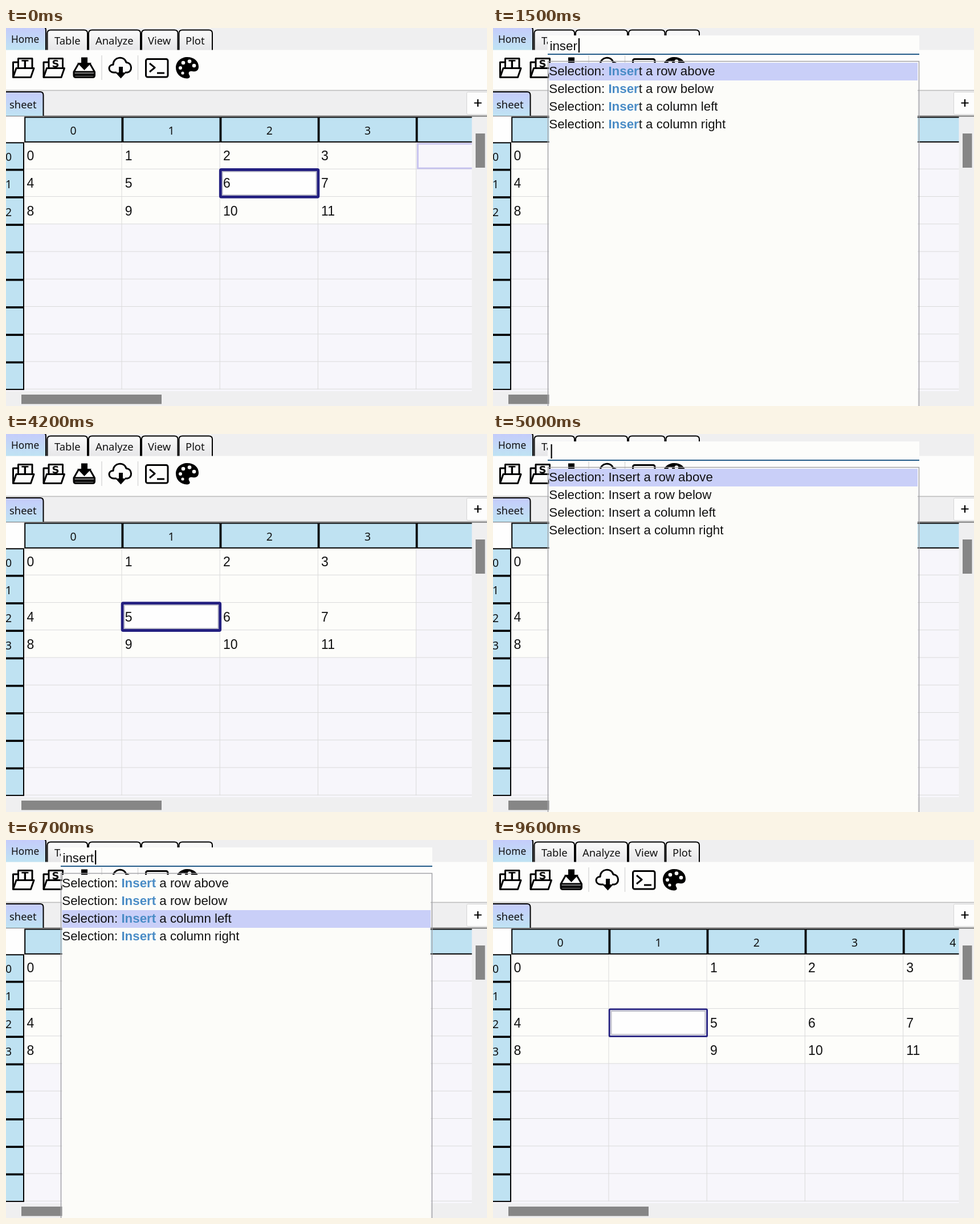
These frames come from a looping animation (844x663 px, 9.7 s). An HTML page:

```html
<!DOCTYPE html>
<html lang="en">
<head>
<meta charset="utf-8">
<title>Spreadsheet command palette</title>
<style>
html, body { margin: 0; width: 100%; height: 100%; overflow: hidden; background: #efeff0; }
svg { display: block; width: 844px; height: 663px; }
text { white-space: pre; }
.ui { font-family: "Noto Sans", "Open Sans", sans-serif; font-size: 18.4px; fill: #111; }
.num { font-size: 19.5px; text-anchor: middle; }
.cell { font: 23px "Liberation Sans", Arial, sans-serif; fill: #111; }
.cmd { font: 22.3px "Liberation Sans", Arial, sans-serif; fill: #111; }
.hit { font-weight: bold; fill: #4a8cc6; }
.icon { fill: none; stroke: #000; stroke-width: 3; stroke-linejoin: round; }
.solid { fill: #000; stroke: none; }
</style>
</head>
<body>
<svg id="stage" viewBox="0 0 844 663" xmlns="http://www.w3.org/2000/svg">
  <defs>
    <linearGradient id="active" x2="0" y2="1"><stop stop-color="#c5cbfb"/><stop offset="1" stop-color="#bfe3f3"/></linearGradient>
    <linearGradient id="idle" x2="0" y2="1"><stop stop-color="#fbfbfb"/><stop offset="1" stop-color="#e6e6e8"/></linearGradient>
    <clipPath id="view"><rect y="155" width="817.5" height="482"/></clipPath>
  </defs>
  <rect width="844" height="663" fill="#efeff0"/>
  <rect y="38.5" width="844" height="70" fill="#fdfdfc"/>
  <path d="M0 109.5H844" stroke="#bcbcbc" stroke-width="1.5"/>
  <g id="tabs"></g>

  <g class="icon">
    <g id="folders"></g>
    <path d="M127 63L119 77V83Q119 86.500 122.500 86.500H152Q155.500 86.500 155.500 83V77L147.500 63M119 77H155.500"/>
    <path d="M120 82H155" stroke-width="5"/>
    <path class="solid" d="M132 51.500H143V61H150L137.500 74L125 61H132Z"/>
    <path d="M194 78H189C178 77 179 64 188 64.500C188 50 208 48 211 60.500C222 61 222 77 213 78H209"/>
    <path class="solid" d="M198 68H205V78H211L201.500 88.500L192 78H198Z"/>
    <rect x="245.500" y="54.500" width="38.500" height="31.500" rx="3"/>
    <path d="M252 62L261 69.500L252 77M265 79H278"/>
    <path class="solid" d="M318 51C331 51 338 59 338 68C338 75 333 77 327 76C321 75 319 79 322 83C324 87 321 88.500 317 88.500C306 88 298 80 298 69.500C298 59 307 51 318 51Z"/>
    <g fill="#fdfdfc" stroke="none">
      <circle cx="306" cy="70" r="3"/><circle cx="311" cy="61" r="3.300"/>
      <circle cx="322" cy="58.500" r="3.300"/><circle cx="330" cy="66" r="3.300"/><circle cx="310" cy="79" r="2.600"/>
    </g>
  </g>
  <path d="M168 48V91M231.500 48V91" stroke="#d9d9d9" stroke-width="1.500"/>

  <path d="M0 154.500H844" stroke="#777" stroke-width="2"/>
  <path d="M-5 154V112H60Q65.500 112 65.500 118V154" fill="url(#active)" stroke="#000" stroke-width="2"/>
  <text class="ui" x="6" y="141">sheet</text>
  <rect x="808.500" y="112.500" width="40" height="39" rx="2" fill="#fdfdfd" stroke="#d5d5d5"/>
  <path d="M821.500 131.500H834.500M828 125V138" stroke="#000" stroke-width="2.200"/>

  <g id="table" clip-path="url(#view)"></g>
  <rect x="824" y="185" width="16.500" height="60" fill="#868686"/>
  <rect x="27" y="643" width="246" height="16.500" fill="#868686"/>

  <g id="palette">
    <rect x="96" y="13" width="652" height="33" fill="#fdfdfb"/>
    <path d="M96 46H748" stroke="#235b88" stroke-width="2"/>
    <rect x="96.500" y="58.500" width="651" height="620" fill="none" stroke="#a2a2a6" stroke-width="1.500"/>
    <rect x="98.500" y="61" width="646.500" height="602" fill="#fcfcf9"/>
    <rect id="mark" x="98.500" width="646.500" height="31" fill="#c9cff8"/>
    <g id="list"></g>
    <text id="query" class="cmd" x="99.500" y="39"></text>
    <rect id="caret" y="18" width="2.200" height="25" fill="#000"/>
  </g>
</svg>
<script>
const LOOP = 9700, COL = 172.2, ROW = 48.25, LEFT = 203 - COL, TOP = 199;
const $ = id => document.getElementById(id);
const range = n => [...Array(n).keys()];
const colX = c => LEFT + c * COL;
const rowY = r => TOP + r * ROW;
const text = (cls, x, y, s) => `<text class="${cls}" x="${x}" y="${y}">${s}</text>`;
const rect = (x, y, w, h, attrs) => `<rect x="${x}" y="${y}" width="${w}" height="${h}" ${attrs}/>`;

const commands = ['a row above', 'a row below', 'a column left', 'a column right'];
// Each session: opening, the six key strokes, highlight steps, closing.
const sessions = [
  { open: 800, keys: [1100, 1200, 1300, 1400, 1500, 1700], down: [], close: 2300 },
  { open: 4900, keys: [5200, 5300, 5400, 5500, 5600, 5800], down: [6200, 6400], close: 6900 }
];
const passed = (times, t) => times.filter(k => t >= k).length;

function drawTabs() {
  const tabs = [['Table', 72.5, 143, 85], ['Analyze', 145, 236, 157], ['View', 238, 301.5, 249], ['Plot', 303.5, 362, 315]];
  $('tabs').innerHTML =
    '<path d="M-5 38.5V-2H65Q70 -2 70 4V38.5" fill="url(#active)" stroke="#000" stroke-width="2"/>' +
    '<text class="ui" x="9" y="26" style="font-size:17.3px">Home</text>' +
    tabs.map(([name, a, b, x]) =>
      `<path d="M${a} 38.5V9Q${a} 3.5 ${a + 6} 3.5H${b - 6}Q${b} 3.5 ${b} 9V38.5" fill="url(#idle)" stroke="#000" stroke-width="2"/>` +
      text('ui', x, 29, name)).join('');
  $('folders').innerHTML = ['T', 'S'].map((ch, i) =>
    `<g transform="translate(${i * 53.5})"><path d="M21 60H12.500V86"/><path d="M21.500 70V53.500H46V70"/>
    <text x="33.500" y="69" text-anchor="middle" class="solid" style="font:bold 18px 'DejaVu Sans',sans-serif">${ch}</text>
    <path d="M12.500 86.500L18 70.500H49L43.500 86.500Z" fill="#fdfdfc"/></g>`).join('');
}

function cursor(r, c, w) {
  const x = colX(c) + 1.2, y = rowY(r) + 1.3;
  return rect(x, y, COL - 0.8, ROW - 0.6, `fill="#fefefe" stroke="#231f80" stroke-width="${w}" rx="1.5"`) +
    rect(x + 3.3, y + 3.3, COL - 7.4, ROW - 7.2, 'fill="none" stroke="#b9b9c6" stroke-width="1.8"');
}

function drawTable({ newRow, newCol, r, c, width, hover }) {
  const rows = 3 + newRow, cols = 4 + newCol;
  let s = rect(0, 155, 818, 482, 'fill="#f7f6fb"') +
    rect(LEFT, TOP, cols * COL, rows * ROW, 'fill="#fdfdfa"');
  let grid = '';
  for (const i of range(9)) grid += `M32 ${rowY(i + 1)}H818`;
  for (const i of range(4)) grid += `M${colX(i + 1)} 200V634`;
  s += `<path d="${grid}" stroke="#dadada"/>`;
  if (hover) s += rect(722.5, 203, 110, 43, 'fill="none" stroke="#c5c1ee" stroke-width="2.8"');
  s += cursor(r, c, width);

  for (const i of range(3)) for (const j of range(4)) {
    const y = i + (newRow && i > 0 ? 1 : 0), x = j + (newCol && j > 0 ? 1 : 0);
    s += text('cell', 36.5 + x * COL, 232 + y * ROW, i * 4 + j);
  }

  s += rect(0, 156, 32, 44, 'fill="#fefefe"');
  for (const i of range(5)) {
    s += rect(33.2 + i * 172.1, 156.5, 170.3, 43.3, 'fill="#bfe2f2" stroke="#000" stroke-width="2"');
    if (i < cols) s += text('ui num', 118 + i * 172.2, 187, i);
  }
  for (const i of range(9)) {
    s += rect(-5, 201.3 + i * ROW, 36, 46.6, 'fill="#bfe2f2" stroke="#000" stroke-width="2"');
    if (i < rows) s += text('ui num', 4.5, 233 + i * ROW, i);
  }
  $('table').innerHTML = s;
}

function drawPalette(open, typed, row) {
  $('palette').style.display = open ? '' : 'none';
  if (!open) return;
  $('query').textContent = 'insert'.slice(0, typed);
  $('caret').setAttribute('x', 101.5 + (typed ? $('query').getComputedTextLength() : 0));
  $('mark').setAttribute('y', 61 + row * 31);
  $('list').innerHTML = commands.map((name, i) =>
    text('cmd', 98.3, 83 + i * 31,
      `Selection: <tspan class="hit">${'Insert'.slice(0, typed)}</tspan>${'Insert'.slice(typed)} ${name}`)).join('');
}

let lastTable, lastPalette;
function render(t) {
  const table = {
    newRow: +(t >= sessions[0].close),
    newCol: +(t >= sessions[1].close),
    r: t < 3300 ? 1 : 2,
    c: t < 3700 ? 2 : 1,
    width: t < 9300 ? 5 : 2.8,
    hover: t < 200
  };
  const now = sessions.find(p => t >= p.open && t < p.close);
  const palette = now ? [true, passed(now.keys, t), passed(now.down, t)] : [false, 0, 0];
  const tableKey = Object.values(table).join(), paletteKey = palette.join();
  if (tableKey !== lastTable) drawTable(table);
  if (paletteKey !== lastPalette) drawPalette(...palette);
  lastTable = tableKey;
  lastPalette = paletteKey;
}

drawTabs();
const start = performance.now();
function tick() {
  render((performance.now() - start) % LOOP);
  requestAnimationFrame(tick);
}
tick();
</script>
</body>
</html>
```
